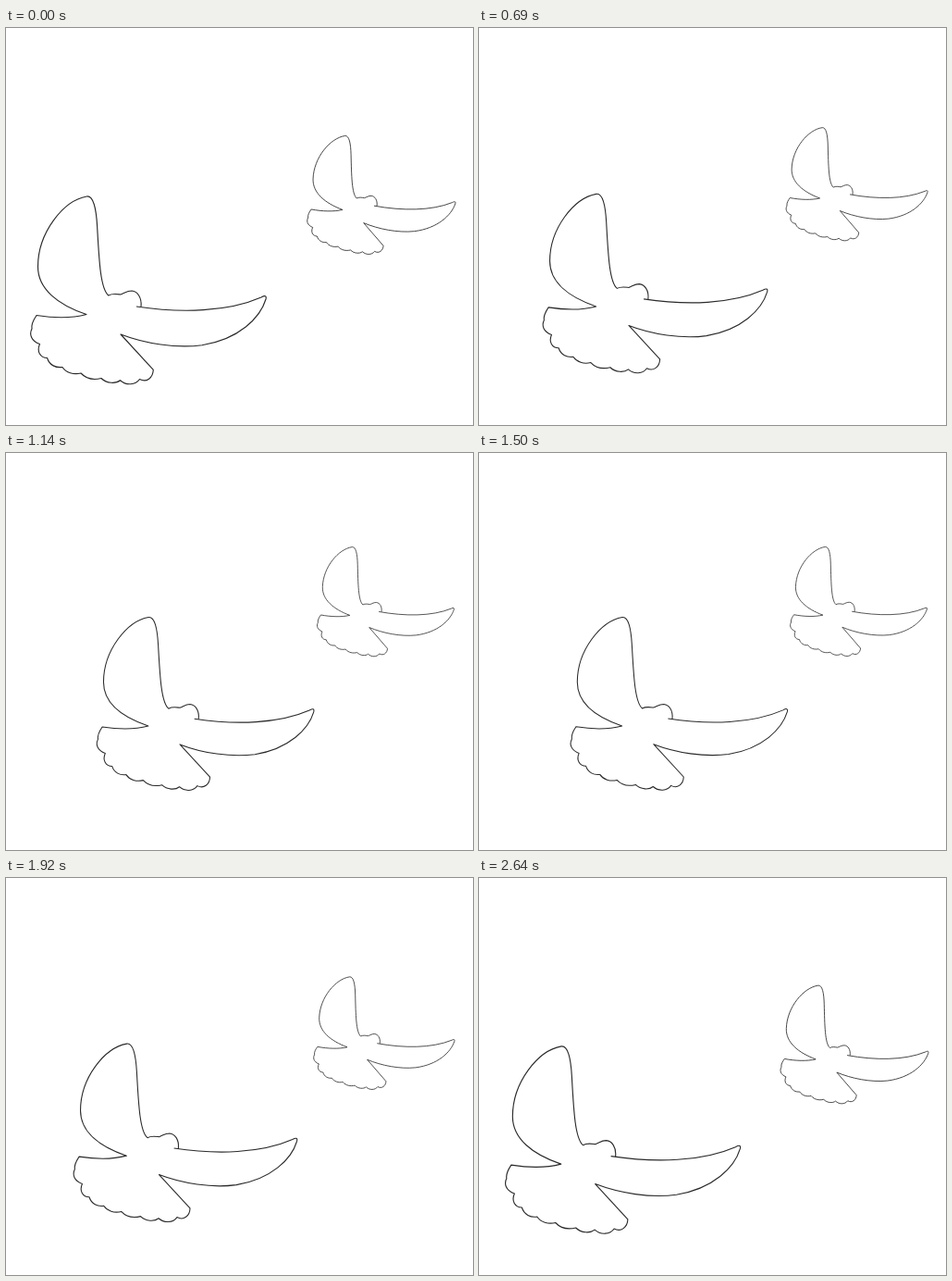
An HTML page for the animation above (2.67 s loop, 505 by 429 pixels).

```html
<!DOCTYPE html>
<html lang="en">
<head>
<meta charset="utf-8">
<title>Two doves</title>
<style>
  html, body { margin: 0; width: 100%; height: 100%; overflow: hidden; background: #fff; }
  svg { display: block; width: 100%; height: 100%; }
</style>
</head>
<body>
<svg viewBox="0 0 505 429">
  <defs>
    <path id="dove" fill="none" stroke="#2a2a2a" stroke-linejoin="round" d="
      M141 301 C190 308.300 240 306.800 276 291 C280 288.800 282 289 281 293
      C275 313 252 336.300 212 342.700 C184 346.500 150 341 124 331
      L159.300 369.300
      C159 378 152 383.500 144.500 379.500
      C140 386 130 386.500 123.500 380.700
      C119 384.500 109 384.500 103 378.500
      C95 380.500 87 379.500 81 373
      C73 375 65 372.500 61 366.500
      C54 367.500 47 364.500 44.500 356.500
      C37 356.500 33 349.500 36.500 341.500
      C27 338 25 331 28 325
      C27 320 30 315 33 310.500
      C52 313.500 72 313.500 87 309.500
      C56 299 34.500 282 34.500 258
      C34.500 221 62 186.500 87.300 182
      C94.500 181 97.500 195 98.600 214
      C100.600 250 102 282 110.800 289
      C115 286.500 120 287.500 124 288
      C129 286 131 284 136 284
      C142 284.500 147 291 146 301"/>
  </defs>
  <use id="near" href="#dove" stroke-width="1.15"/>
  <use id="far" href="#dove" stroke-width="1.35"/>
</svg>
<script>
const STEP = 30, COUNT = 89, PEAK = 44, EASE = 0.06;

// Poses are anchored at the notch between tail and right wing.
const birds = [
  { id: 'near', turn: 0, from: [124, 331, 1], to: [198.7, 312.2, 0.909] },
  { id: 'far', turn: 1.8, from: [386.7, 210.6, 0.627], to: [393.8, 184.8, 0.571] }
].map(b => ({ ...b, el: document.getElementById(b.id) }));

const mix = (a, b, u) => a + (b - a) * u;
const easeIn = u => u - EASE * u * (1 - u);

function draw(ms) {
  const k = Math.floor(ms / STEP) % COUNT;
  const u = k <= PEAK ? easeIn(k / PEAK) : (COUNT - k) / (COUNT - PEAK);
  for (const { el, turn, from, to } of birds) {
    const [x, y, s] = from.map((v, i) => mix(v, to[i], u));
    el.setAttribute('transform',
      `translate(${x} ${y}) rotate(${turn}) scale(${s}) translate(-124 -331)`);
  }
}

const start = performance.now();
function tick(now) {
  draw(Math.max(0, now - start));
  requestAnimationFrame(tick);
}
draw(0);
requestAnimationFrame(tick);
</script>
</body>
</html>
```
